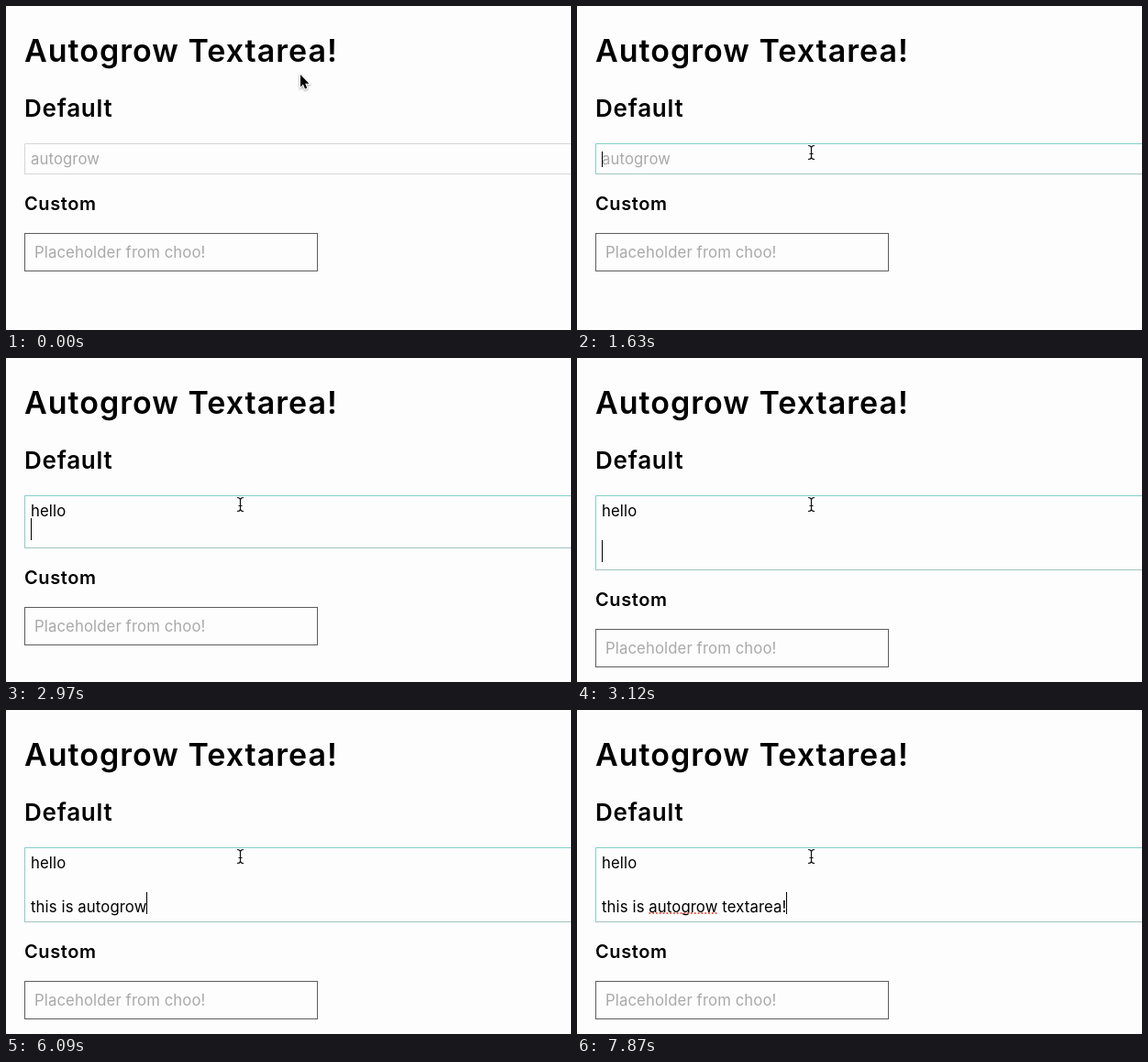
An HTML page that plays this animation: 616 by 354 pixels, repeating every 8000 ms.

```html
<!DOCTYPE html>
<html lang="en">
<head>
<meta charset="utf-8">
<title>Autogrow Textarea!</title>
<style>
html, body { margin: 0; width: 100%; height: 100%; overflow: hidden; background: #fdfdfd; }
svg { display: block; width: 616px; height: 354px; font: 400 16.7px Inter, "Liberation Sans", sans-serif; letter-spacing: .12px; }
.head { font-weight: 600; letter-spacing: .03em; }
.hint { fill: #a9a9a9; }
.line { fill: none; stroke: #d6d6d6; }
.focus .edge { stroke: #84cfca; }
.focus .base { stroke: #a3c4c1; }
#caret { display: none; }
.focus #caret { display: block; }
#arrow { filter: drop-shadow(0 1px 1px #0006); }
</style>
</head>
<body>
<svg id="stage" viewBox="0 0 616 354">
  <text class="head" x="20" y="60.5" font-size="34">Autogrow Textarea!</text>
  <text class="head" x="20" y="121" font-size="26">Default</text>

  <path id="edge" class="line edge"/>
  <path id="base" class="line base"/>
  <text id="hint" class="hint" x="27" y="173">autogrow</text>
  <text id="row0" x="27" y="173" xml:space="preserve"></text>
  <text id="row2" x="27" y="221" xml:space="preserve"></text>
  <path id="spell" fill="none" stroke="#f0513f" stroke-width="2.2" stroke-linecap="round" stroke-dasharray="0 3.8"/>
  <rect id="caret" width="1"/>

  <g id="below">
    <text class="head" x="20" y="223" font-size="20">Custom</text>
    <rect x="20.5" y="248.5" width="319" height="41" fill="none" stroke="#5c5c5c"/>
    <text class="hint" x="31" y="275">Placeholder from choo!</text>
  </g>

  <path id="arrow" d="M0 0V13.4L3 10.6L5 15.4L7.2 14.5L5.2 9.7H9.4Z" stroke="#fff" stroke-width="2" paint-order="stroke"/>
  <path id="beam" d="M-3.5-7.5Q-.5-7.5 0-5.5Q.5-7.5 3.5-7.5M0-5.5V5.5M-3.5 7.5Q-.5 7.5 0 5.5Q.5 7.5 3.5 7.5M-2 1.5H2" fill="none" stroke="#111" stroke-width="1.2"/>
</svg>
<script>
// The screen refreshes on a steady tick; every change lands on one.
const LOOP = 8000, START = 146, TICK = 148.4;
const MOVES = 5, FOCUS = 10, TYPING = 13;
// One entry per tick; an empty entry is a pause.
const strokes = "h|e|l|l|o||\n|\n|t|hi|s||| |is| |||a|u|t|o||g||r|o|w| t|e||x|t||a|re|a|||!".split("|");

const el = id => document.getElementById(id);
const set = (id, attrs) => { for (const k in attrs) el(id).setAttribute(k, attrs[k]); };
const show = (id, on) => set(id, { visibility: on ? "visible" : "hidden" });
const pen = document.createElement("canvas").getContext("2d");

function endOf(text) {
  pen.font = '400 16.7px Inter, "Liberation Sans", sans-serif';
  pen.letterSpacing = ".12px";
  return 27 + pen.measureText(text).width;
}

function drawPointer(tick) {
  const k = Math.min(1, (tick + 1) / MOVES);
  const p = k * k * (3 - 2 * k);
  const x = 321 - 65.5 * p, y = 75 + 85 * p;
  const over = y > 150;
  show("arrow", !over);
  show("beam", over);
  set(over ? "beam" : "arrow", { transform: `translate(${x} ${y})` });
}

function drawField(tick) {
  const typed = strokes.slice(0, Math.max(0, tick - TYPING + 1)).join("");
  const rows = typed.split("\n");
  const last = rows.length - 1;
  const grow = 24 * last, bottom = 183.5 + grow;

  el("stage").classList.toggle("focus", tick >= FOCUS);
  show("hint", !typed);
  el("row0").textContent = rows[0];
  el("row2").textContent = rows[2] || "";
  set("edge", { d: `M20.5 ${bottom}V150.5H616` });
  set("base", { d: `M20 ${bottom}H616` });
  set("below", { transform: `translate(0 ${grow})` });
  set("caret", {
    x: Math.round(endOf(rows[last])),
    y: last ? 151 + grow : 159,
    height: last ? 24 : 17
  });

  // The unknown word is marked once a space follows it.
  set("spell", { d: `M${endOf("this is ") + 1} 222H${endOf("this is autogrow") - 1}` });
  show("spell", typed.includes("autogrow "));
}

function frame(now) {
  const tick = Math.floor((now % LOOP - START) / TICK);
  drawPointer(tick);
  drawField(tick);
  requestAnimationFrame(frame);
}
requestAnimationFrame(frame);
</script>
</body>
</html>
```
